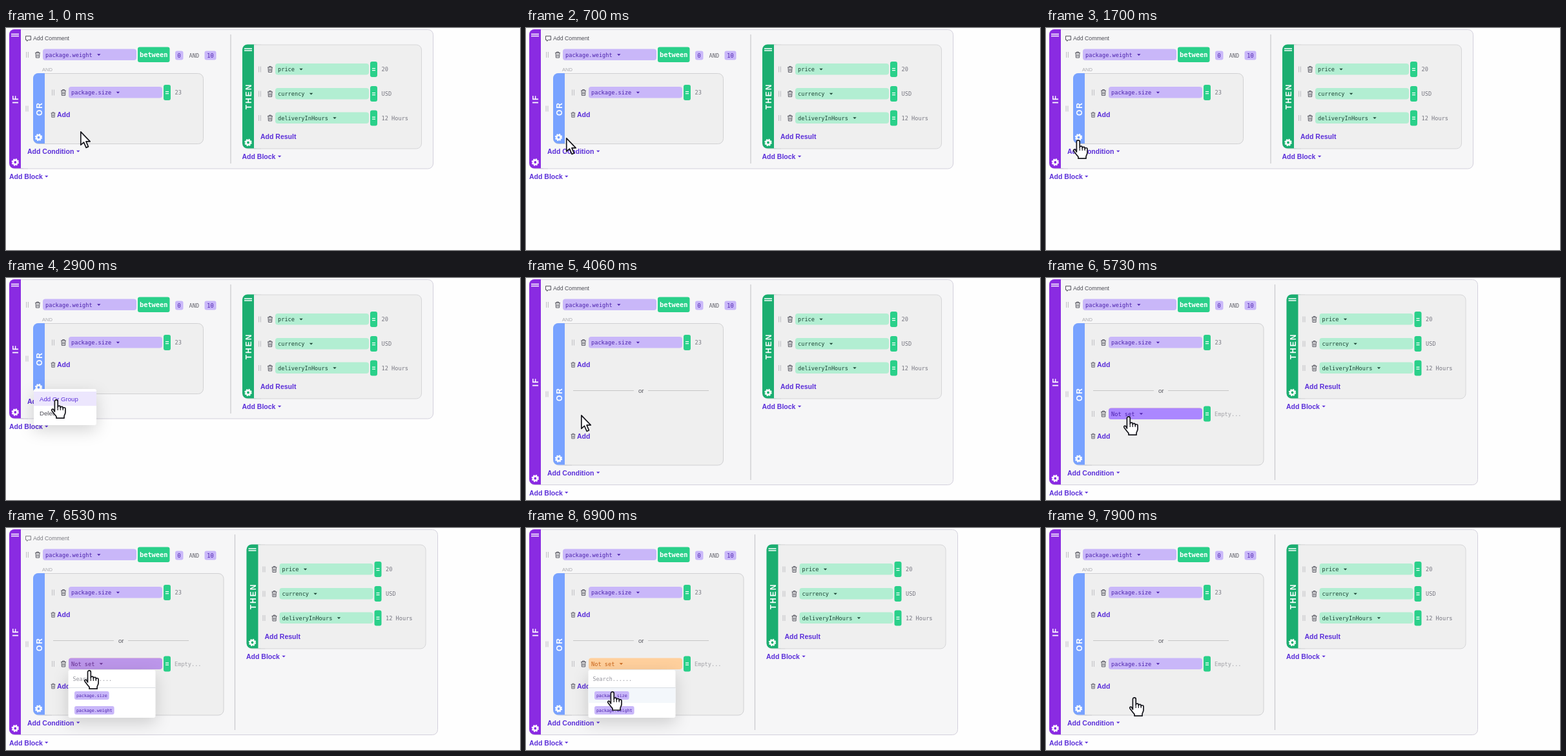
These frames come from a looping animation (796 by 344 pixels, 8000 ms). An HTML page:

```html
<!DOCTYPE html>
<html lang="en">
<head>
<meta charset="utf-8">
<title>Rule editor</title>
<style>
  html, body { margin: 0; width: 100%; height: 100%; overflow: hidden; background: #fefefe; }
  svg { display: block; }
  text { font-family: "Liberation Sans", Arial, sans-serif; white-space: pre; }
  .mono { font-family: "DejaVu Sans Mono", monospace; font-size: 8.65px; }
  .link { font-size: 10.5px; font-weight: bold; fill: #5b2fd9; }
  .side { font-size: 12px; font-weight: bold; letter-spacing: 2px; fill: #fff; text-anchor: middle; }
  .popup { filter: drop-shadow(0 8px 12px rgba(0, 0, 0, .16)); }
</style>
</head>
<body>
<svg id="stage" width="796" height="344" viewBox="0 0 796 344"></svg>
<script>
const LOOP = 8000;
const lavender = '#c9b7f9', violet = '#4c22ad', mint = '#b2eed2', green = '#2ad08a',
      orange = '#ffd09d', panelGrey = '#efefef', cardGrey = '#f6f6f7';

// Drawing helpers. data-dx, data-dy, data-dw and data-dh say how far a part
// shifts or grows when the second group (y) and its condition row (x) appear.
const rect = (x, y, w, h, fill, r = 0, extra = '') =>
  `<rect x="${x}" y="${y}" width="${w}" height="${h}" rx="${r}" fill="${fill}" ${extra}/>`;
const text = (x, y, content, cls, fill = '', extra = '') =>
  `<text x="${x}" y="${y}" class="${cls}" ${fill && `fill="${fill}"`} ${extra}>${content}</text>`;
const mono = (x, y, content, fill, extra) => text(x, y, content, 'mono', fill, extra);
const group = (attrs, ...parts) => `<g ${attrs}>${parts.join('')}</g>`;
const line = (d, color, width = 1, extra = '') =>
  `<path d="${d}" fill="none" stroke="${color}" stroke-width="${width}" ${extra}/>`;
const caret = (x, y, fill) => `<path d="M${x - 2.7} ${y - 1.3}h5.4l-2.7 2.8z" fill="${fill}"/>`;
const grip = (x, y) => line(`M${x - 1.4} ${y - 4.5}v9M${x + 1.4} ${y - 4.5}v9`, '#bdbdc2');
const trash = (x, y, s = 1) => line(
  'M-4-3h8M-1.5-3v-1.5h3V-3M-3-3l.4 7.5h5.2L3-3M-1-1v4M1-1v4', '#5d5d66', 1,
  `transform="translate(${x} ${y}) scale(${s})"`);
const gear = (x, y) =>
  `<circle cx="${x}" cy="${y}" r="3.2" fill="none" stroke="#fff" stroke-width="2.6"/>` +
  `<circle cx="${x}" cy="${y}" r="4.9" fill="none" stroke="#fff" stroke-width="1.6" stroke-dasharray="2.3 1.548"/>`;
const handle = (x, y) => line(`M${x - 6} ${y}h12m0 3h-12`, '#fff', 1.5);
const sideLabel = (x, y, label) =>
  text(0, 0, label, 'side', '', `transform="translate(${x} ${y}) rotate(-90)"`);
const link = (x, y, label, caretX) =>
  text(x, y, label, 'link') + (caretX ? caret(caretX, y - 4, '#5b2fd9') : '');

function panel(x, y, w, h, color, body, edge, dw, dh) {
  const grow = `data-dh="${dh}"`;
  return rect(x + .5, y + .5, w, h, body, 8, `stroke="${edge}" data-dw="${dw}" ${grow}`) +
    rect(x, y, 28, h, color, 8, grow) +
    rect(x + 18, y, 11, h, body, 0, grow) +
    line(`M${x + 18} ${y + .5}h11`, edge) +
    line(`M${x + 18} ${y + h + .5}h11`, edge, 1, `data-dy="${dh}"`);
}
const field = (x, y, label, fill, color) =>
  rect(x, y - 9, 145, 17.5, fill, 4) + mono(x + 4, y + 3, label, color) +
  caret(x + 14 + label.length * 5.2, y, color);
const equals = (x, y) => rect(x, y - 12, 11, 24, green, 3) +
  line(`M${x + 3} ${y - 1.3}h5m0 3h-5`, '#fff', 1.2);
const rowTools = (x, y) => grip(x - 24, y) + trash(x - 8, y);
const row = (x, y, label, value, fill, color) => rowTools(x, y) +
  field(x, y, label, fill, color) + equals(x + 147, y) + mono(x + 164.5, y + 3, value, '#777781');
const addLine = y => trash(73, y, .85) + link(79, y + 3.5, 'Add');
const chip = (y, label) => rect(106, y, label.length * 3.97 + 6, 13, lavender, 3) +
  mono(109, y + 9, label, violet, 'style="font-size:6.6px"');

const card = group('',
  panel(5, 2, 656, 215.5, '#8a2be2', cardGrey, '#d3d0dc', 7, 102.5),
  handle(14, 9.5),
  group('data-dy="51"', sideLabel(18.7, 110, 'IF')),
  group('data-dy="102.5"', gear(14.3, 208), link(5, 234, 'Add Block', 62.7)),
  group('id="comment"',
    line('M30.5 12.5h8v6h-4l-2 2v-2h-2z', '#55555c'),
    text(42, 19, 'Add Comment', '', '#4c4c55', 'font-size="8.75"')),
  rowTools(57, 41.5), field(57, 41.5, 'package.weight', lavender, violet),
  rect(204, 29.5, 49.5, 23.5, green, 3),
  mono(207, 45, 'between', '#fff', 'style="font-size:10.3px;font-weight:bold"'),
  rect(262, 35.5, 12.5, 14, lavender, 3), mono(265.6, 45.5, '0', violet),
  mono(283.5, 45.5, 'AND', '#63636c'),
  rect(307.5, 35.5, 18, 14, lavender, 3), mono(311.3, 45.5, '10', violet),
  text(56, 66.5, 'AND', '', '#a9a9ad', 'font-size="7.6"'),
  group('data-dy="55"', grip(32.5, 125)));

const orPanel = group('',
  panel(42, 70, 263, 109, '#78a2ff', panelGrey, '#d0d0d2', 31.5, 110.5),
  group('data-dy="55"', sideLabel(56, 125, 'OR')),
  group('data-dy="110.5"', gear(50.5, 169.5), link(33, 195, 'Add Condition', 111.7)),
  row(97, 100, 'package.size', '23', lavender, violet),
  addLine(134.5),
  group('id="second"',
    line('M73 174.5h94M189 174.5h94', '#c6c6c6'),
    text(174, 178, 'or', '', '#55555c', 'font-size="9.6"'),
    addLine(245)),
  group('id="newRow"',
    rowTools(97, 210.5),
    group('id="unset"', field(97, 210.5, 'Not set', orange, '#c8641a')),
    group('id="hover"', field(97, 210.5, 'Not set', '#ab87ff', violet)),
    group('id="chosen"', field(97, 210.5, 'package.size', lavender, violet)),
    equals(244, 210.5), mono(261, 213.5, 'Empty...', '#a3a3a8')));

const thenPanel = group('data-dx="6.5"',
  line('M348 10v200', '#cccccf', 1.3, 'id="divider"'),
  panel(366, 25.5, 277, 161, '#1bae70', panelGrey, '#d6d6d8', 0, 0),
  handle(375, 32), sideLabel(380, 106, 'THEN'), gear(375, 177.5),
  row(417, 64, 'price', '20', mint, '#1d4536'),
  row(417, 102, 'currency', 'USD', mint, '#1d4536'),
  row(417, 139.5, 'deliveryInHours', '12 Hours', mint, '#1d4536'),
  link(394, 172, 'Add Result'), link(365.5, 203, 'Add Block', 423.6));

const popups =
  group('id="menu"',
    rect(43, 172, 97, 56, '#fff', 3, 'class="popup"'),
    rect(43, 176, 97, 22, '#ece6fd', 0, 'id="pressed"'),
    text(52, 190.5, 'Add Or Group', '', '#4c4c55', 'font-size="9.6" id="menuItem"'),
    text(52, 213, 'Delete', '', '#4c4c55', 'font-size="9.6"')) +
  group('id="list"',
    rect(96.5, 220, 135, 74, '#fff', 3, 'class="popup"'),
    mono(103.5, 237, 'Search......', '#94949c', 'style="font-size:8.4px"'),
    rect(96.5, 248, 135, 23, '#f3f7fb', 0, 'id="option"'),
    line('M96.5 247.5h135', '#d9dde2'),
    chip(253, 'package.size'), chip(276, 'package.weight'));

const cursor = group('id="cursor" fill="#fff" stroke="#16161c" stroke-width="1.7" stroke-linejoin="round"',
  '<path id="arrow" d="M.8.8v20.4l4.7-4.1 3.6 8.3 3.4-1.5-3.5-8.1h6.2z"/>',
  group('id="hand"',
    '<path d="M-2.6 19V3.2a2.4 2.4 0 0 1 4.8 0V12a2 2 0 0 1 4 .3v.8a2 2 0 0 1 4 .4v1a1.9 1.9 0 0 1 3.8.3V20c0 3-2 4.5-2 6.5v2.7H0v-2.5C-2-24.5-2 24.5-3 23l-3.8-5c-1.6-2.4 1-3.8 2.5-2z"/>'.replace('-2-24.5-2 24.5-3 23', '-1 25-2 24.5-3 23'),
    line('M2.2 12v5M6.2 13v4M10.2 14v3', '#16161c', 1.2)));

const stage = document.getElementById('stage');
stage.innerHTML = card + orPanel + thenPanel + popups + cursor;
const $ = id => document.getElementById(id);
const resizable = [...stage.querySelectorAll('rect[data-dh]')].map(el => ({
  el, w: +el.getAttribute('width'), h: +el.getAttribute('height') }));
const movable = [...stage.querySelectorAll('[data-dx], [data-dy]')];

// Pointer stops: time, x, y
const path = [
  [0, 115, 160], [300, 115, 160], [450, 104, 162], [700, 62, 170], [900, 50, 173],
  [2300, 50, 173], [2450, 64, 181], [2660, 78, 188], [3930, 78, 188], [4060, 85, 212],
  [4250, 90, 235], [4460, 92, 246], [5120, 92, 246], [5300, 108, 232], [5530, 124, 219],
  [5730, 128, 214], [6460, 128, 214], [6650, 131, 230], [6900, 134, 253], [7060, 137, 262], [8000, 137, 262]
];
const handTimes = [[840, 3700], [4320, 5200], [5550, LOOP]];

const within = (t, a, b) => t >= a && t < b;
const ramp = (t, start, length) => Math.max(0, Math.min(1, (t - start) / length));
const opacity = (id, value) => $(id).setAttribute('opacity', value);

function pointer(t) {
  const i = path.findIndex(stop => stop[0] > t);
  const [a, b] = [path[i - 1], path[i]];
  const k = (t - a[0]) / (b[0] - a[0]);
  return [1, 2].map(n => a[n] + (b[n] - a[n]) * k);
}

function draw(t) {
  const tall = t >= 3060 ? 1 : 0, wide = t >= 4750 ? 1 : 0;
  for (const { el, w, h } of resizable) {
    el.setAttribute('width', w + wide * (el.dataset.dw || 0));
    el.setAttribute('height', h + tall * el.dataset.dh);
  }
  for (const el of movable) {
    const { dx = 0, dy = 0 } = el.dataset;
    el.setAttribute('transform', `translate(${wide * dx} ${tall * dy})`);
  }
  $('divider').setAttribute('d', `M348 10v${tall ? 303 : 200}`);

  opacity('comment', t < 3060 ? 1 - ramp(t, 2300, 250)
    : Math.min(ramp(t, 3060, 250), 1 - ramp(t, 6460, 250)));
  opacity('second', ramp(t, 3060, 270));
  opacity('newRow', ramp(t, 4750, 200));

  const picked = ramp(t, 7600, 250);
  opacity('unset', t < 7850 ? 1 : 0);
  opacity('hover', Math.min(ramp(t, 5560, 150), 1 - ramp(t, 6500, 150)));
  opacity('chosen', picked);

  opacity('menu', t < 1760 ? 0 : 1 - ramp(t, 3060, 200));
  opacity('pressed', t >= 2900 ? 1 : 0);
  $('menuItem').setAttribute('fill', t >= 2500 ? '#5b2fd9' : '#4c4c55');
  opacity('list', t < 6230 ? 0 : 1 - ramp(t, 7600, 270));
  opacity('option', ramp(t, 6840, 30));

  const isHand = handTimes.some(([a, b]) => within(t, a, b));
  opacity('hand', isHand ? 1 : 0);
  opacity('arrow', isHand ? 0 : 1);
  $('cursor').setAttribute('transform', `translate(${pointer(t)})`);
}

const start = performance.now();
function tick() {
  draw((performance.now() - start) % LOOP);
  requestAnimationFrame(tick);
}
tick();
</script>
</body>
</html>
```
